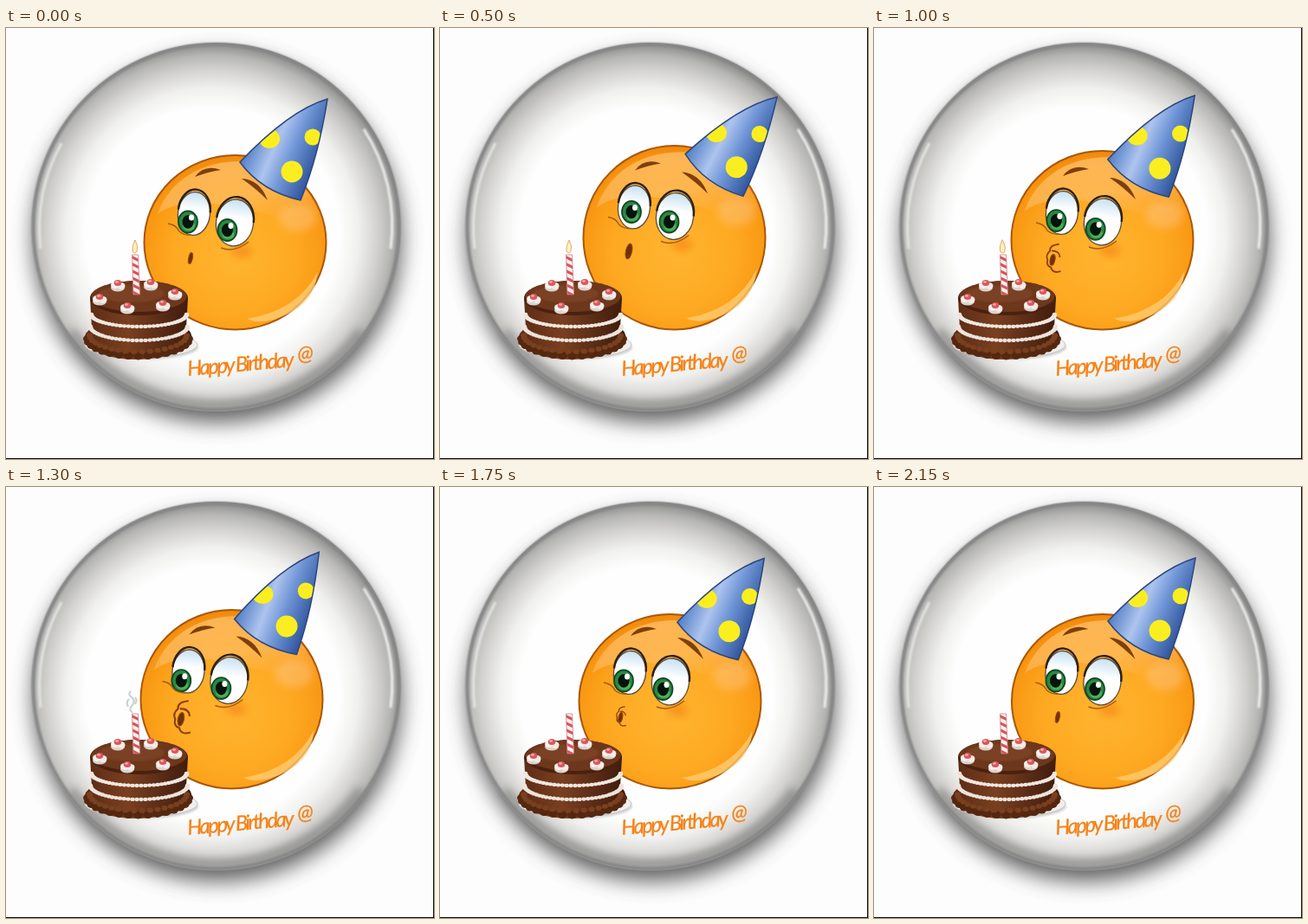
These frames come from a looping animation (494x498 px, 2.2 s). An HTML page:

```html
<!DOCTYPE html>
<html lang="en">
<head>
<meta charset="utf-8">
<title>Happy Birthday</title>
<style>
html, body { margin: 0; width: 100%; height: 100%; overflow: hidden; background: #fdfdfd; }
svg { display: block; width: 494px; height: 498px; }
text { font: italic 24px Lato, "Open Sans", sans-serif; letter-spacing: -2.5px; fill: #f58216; stroke: #f58216; stroke-width: .3; }
</style>
</head>
<body>
<svg viewBox="0 0 494 498">
  <defs>
    <filter id="soft" x="-20%" y="-20%" width="140%" height="140%"><feGaussianBlur stdDeviation="12"/></filter>
    <filter id="edge" x="-10%" y="-10%" width="120%" height="120%"><feGaussianBlur stdDeviation="1"/></filter>
    <filter id="glow" x="-50%" y="-50%" width="200%" height="200%"><feGaussianBlur stdDeviation="5"/></filter>
    <radialGradient id="badge" gradientUnits="userSpaceOnUse" cx="238" cy="238" r="222">
      <stop offset=".66" stop-color="#fefefe"/>
      <stop offset=".76" stop-color="#f0f0ee"/>
      <stop offset=".86" stop-color="#d2d1ce"/>
      <stop offset=".93" stop-color="#b6b6b4"/>
      <stop offset="1" stop-color="#858585"/>
    </radialGradient>
    <radialGradient id="skin" cx=".5" cy=".58" r=".6">
      <stop offset="0" stop-color="#ffb530"/>
      <stop offset=".55" stop-color="#fea922"/>
      <stop offset=".85" stop-color="#f99812"/>
      <stop offset="1" stop-color="#ee820a"/>
    </radialGradient>
    <linearGradient id="shine" x1="0" y1="0" x2=".3" y2="1">
      <stop offset="0" stop-color="#ffd08a" stop-opacity=".6"/>
      <stop offset=".6" stop-color="#ffc67c" stop-opacity=".5"/>
      <stop offset="1" stop-color="#ffc070" stop-opacity="0"/>
    </linearGradient>
    <linearGradient id="hatFill" gradientUnits="userSpaceOnUse" x1="-32" y1="-26" x2="42" y2="6">
      <stop offset="0" stop-color="#5580c6"/>
      <stop offset=".36" stop-color="#adc4ee"/>
      <stop offset=".62" stop-color="#6f95d6"/>
      <stop offset="1" stop-color="#30559c"/>
    </linearGradient>
    <linearGradient id="white" x1="0" y1="0" x2="0" y2="1">
      <stop offset="0" stop-color="#c4e0f2"/>
      <stop offset=".4" stop-color="#fff"/>
    </linearGradient>
    <linearGradient id="choc" x1="0" x2="1">
      <stop offset="0" stop-color="#5a2a14"/>
      <stop offset=".4" stop-color="#7a3f20"/>
      <stop offset="1" stop-color="#3c1a0c"/>
    </linearGradient>
    <path id="coneShape" d="M-35-22Q22-82 66-95Q56-30 35 22Q-10 12-35-22z"/>
    <clipPath id="stage"><path d="M0 73H398V498H0z"/></clipPath>
    <clipPath id="cone"><use href="#coneShape"/></clipPath>
    <clipPath id="wax"><path d="M145.500 262h7l2 46h-7.500z"/></clipPath>
  </defs>

  <rect width="494" height="498" fill="#fdfdfd"/>
  <circle cx="244" cy="243" r="213" fill="#4c4c4c" opacity=".85" filter="url(#soft)"/>
  <circle cx="242.500" cy="230" r="213" fill="url(#badge)"/>
  <path d="M75 350A207 207 0 0 0 410 350" fill="none" stroke="#6c6c6c" stroke-width="12" opacity=".5" filter="url(#glow)"/>
  <g fill="none" filter="url(#edge)">
    <circle cx="242.500" cy="230" r="211" stroke="#868686" stroke-width="4"/>
    <path d="M413 117A204 204 0 0 1 444 255" stroke="#f0f0f0" stroke-width="3"/>
    <path d="M40 255A204 204 0 0 1 64 133" stroke="#e4e4e4" stroke-width="3"/>
  </g>

  <g clip-path="url(#stage)">
    <g id="head">
      <ellipse rx="105" ry="105" fill="url(#skin)" stroke="#a9570a" stroke-width="2"/>
      <path d="M-90-34C-72-84-24-104 28-96C72-88 98-52 100-14C64-26 20-40-20-46C-52-50-74-46-90-34z" fill="url(#shine)"/>
      <ellipse cx="72" cy="-30" rx="22" ry="16" fill="#ffcf9a" opacity=".4" filter="url(#glow)"/>
      <path d="M14 92Q72 82 95 36Q92 78 44 93Q24 98 14 92z" fill="#ffd27c" opacity=".7"/>
    </g>
    <g id="features">
      <ellipse cx="272" cy="258" rx="12" ry="7" fill="#f47a08" opacity=".6" filter="url(#glow)"/>
      <g id="eyes"></g>
      <g fill="#7d3f0c">
        <path d="M218 172Q229 157 248 164Q234 166 218 172z"/>
        <path d="M272 174Q293 175 302 199Q288 185 272 174z"/>
      </g>
      <path d="M187 226q9 1 13 9q6 5 14 4M248 254q16 6 32-7" fill="none" stroke="#a85c0c" stroke-width="1.500"/>
    </g>
    <g id="lips" fill="#ffab2c" stroke="#8a4206" stroke-width="1.900" stroke-linejoin="round">
      <path d="M6-17Q-5-16-4-9Q-10-4-7 2Q-9 9-3 11Q-1 19 8 17Q13 8 9 0Q12-9 6-17z" stroke="none"/>
      <path d="M7-17Q-5-16-4-9Q-10-4-7 2Q-9 9-3 11Q-1 19 9 16M-2-9Q8-9 8-1" fill="none"/>
    </g>
    <ellipse id="mouth" fill="#713006" stroke="#94480a"/>
    <g id="hat">
      <g clip-path="url(#cone)">
        <path d="M-40-100H70V30H-40z" fill="url(#hatFill)"/>
        <g fill="#fbee20">
          <ellipse cx="-1" cy="-49" rx="12" ry="11"/>
          <circle cx="49" cy="-51" r="9.500"/>
          <circle cx="25" cy="-11" r="12.500"/>
        </g>
      </g>
      <use href="#coneShape" fill="none" stroke="#2b467d" stroke-width="1.500"/>
    </g>
  </g>

  <g id="cake"></g>
  <path id="flame" d="M149 245Q153 252 151 258Q148.500 262 146 258Q145 252 149 245z" fill="#fff0c4" stroke="#e9a866"/>
  <path id="smoke" d="M146 262q-5-4 0-9q4-5-1-9q-5-3-1-7M141 255q-3-5 1-9M149 252q3-4 0-8" fill="none" stroke="#c4c8cc" stroke-width="2.200"/>

  <text transform="translate(210 402) rotate(-5)">Happy Birthday</text>
  <text transform="translate(337 385) rotate(-5)">@</text>
  <path d="M493 0h1v498H0v-1h493z" fill="#080808"/>
</svg>
<script>
const $ = id => document.getElementById(id);
const ellipse = (x, y, rx, ry, fill, more = '') =>
  `<ellipse cx="${x}" cy="${y}" rx="${rx}" ry="${ry}" fill="${fill}" ${more}/>`;
const range = (n, fn) => Array.from({ length: n }, (_, i) => fn(i)).join('');

// Beads along the front half of an ellipse
const beads = (n, cx, cy, rx, ry, r, fill) => range(n, i => {
  const a = Math.PI * i / (n - 1);
  return ellipse((cx - rx * Math.cos(a)).toFixed(1), (cy + ry * Math.sin(a)).toFixed(1), r, r * .8, fill);
});

const rosette = ([x, y]) =>
  ellipse(x, y + 3, 8, 4.5, '#ddd2cc') + ellipse(x - 3, y, 5, 4, '#f8f1ed') +
  ellipse(x + 4, y + 1, 4.5, 4, '#f4ebe7') + ellipse(x, y - 2.5, 4.3, 3.5, '#d9575c') +
  ellipse(x - 1, y - 3.5, 2, 1.3, '#f5b0ac');

$('cake').innerHTML =
  ellipse(158, 369, 64, 14, '#a9a9a9', 'opacity=".5" filter="url(#edge)"') +
  ellipse(156, 366, 65, 15, '#f0efee', 'stroke="#c6c4c2"') +
  '<path d="M97 312L99 347Q90 351 91 361Q105 383 153 383Q205 381 215 360Q214 350 208 346L210 312z" fill="url(#choc)"/>' +
  beads(17, 152.5, 359, 58, 20, 5.5, '#55270f') +
  beads(20, 152.5, 355, 56, 19, 3.5, '#79401f') +
  beads(36, 153.5, 345, 56, 16, 2.7, '#ece4dc') +
  beads(36, 153.5, 331, 55, 14, 2.7, '#efe7df') +
  ellipse(153.5, 312, 56.5, 20, '#4a2110') +
  ellipse(153.5, 310, 55, 18, '#6d371c') +
  ellipse(145, 307, 38, 10, '#84482a', 'opacity=".6" filter="url(#edge)"') +
  [[129, 297], [167, 296], [108, 313], [195, 307], [181, 320], [140, 323]].map(rosette).join('') +
  '<g clip-path="url(#wax)"><path d="M140 255h20v60h-20z" fill="#fff1ee"/>' +
  range(7, i => `<path d="M142 ${263 + i * 8}l14 7" stroke="#d6545c" stroke-width="3.2"/>`) + '</g>' +
  '<path d="M145.500 262h7l2 46h-7.500z" fill="none" stroke="#c98084" stroke-width=".8"/>';

const iris = (id, x, y) => `<g id="${id}">` +
  ellipse(x, y, 11, 12.5, '#2a8842', 'stroke="#124a26" stroke-width="1.8"') +
  ellipse(x + 1, y + 5, 7, 5.5, '#4fae59') + ellipse(x, y, 6.5, 7.8, '#06140c') +
  ellipse(x + 4, y - 5, 3, 3.5, '#fff') + '</g>';
const eye = (id, x, y, rx, ry, tilt, ix, iy) =>
  `<g transform="rotate(${tilt} ${x} ${y})">` +
  ellipse(x, y, rx, ry, 'url(#white)', 'stroke="#5d4a38" stroke-width="1.3"') +
  `<path d="M${x - rx} ${y - 3}A${rx} ${ry} 0 0 1 ${x + rx} ${y - 3}" fill="none" stroke="#2c2117" stroke-width="2.4"/></g>` +
  iris(id, ix, iy);
$('eyes').innerHTML = eye('irisL', 217, 214.5, 18.5, 25, 6, 210, 224) + eye('irisR', 264, 225, 21.5, 27, 8, 255.5, 233.5);

// time, head x, head top, face dx dy, hat dx dy turn, gaze, mouth x y, open, pucker
const LOOP = 2200, STEP = 50, FLOOR = 348.5;
const poses = [
  [0, 264.5, 147, 0, 0, 0, 0, 0, 0, 213, 266, 0, 0],
  [500, 270.5, 136, 7, -7.5, 11.5, -7, 4, 1, 218, 258, .5, 0],
  [800, 276, 129, 14.5, -13, 21.5, -10.5, 5.5, 1, 222, 251, 1, 0],
  [1000, 263.5, 142, 0, -1, 0, -3.5, -.5, .1, 207, 266, .2, .95],
  [1300, 260.5, 142, -6.5, -1.5, -5.5, -4, -2.5, -.3, 203, 266, .5, 1.1],
  [1750, 265.5, 147, 2, 0, 4, 1, -.5, 0, 209, 265, 0, .65],
  [2150, 264, 147, -.5, 0, 0, 0, 0, 0, 212, 266, 0, 0]
];
poses.push([LOOP, ...poses[0].slice(1)]);

const secant = (i, j) => (poses[i + 1][j] - poses[i][j]) / (poses[i + 1][0] - poses[i][0]);

// Smooth through each pose, at rest where a value turns back
function slope(i, j) {
  if (i === 0 || i === poses.length - 1) return 0;
  const a = secant(i - 1, j), b = secant(i, j);
  return a * b <= 0 ? 0 : 2 * a * b / (a + b);
}

function poseAt(t) {
  const i = Math.max(1, poses.findIndex(p => p[0] >= t)) - 1;
  const a = poses[i], b = poses[i + 1], span = b[0] - a[0], k = (t - a[0]) / span;
  const ease = k * k * (3 - 2 * k), rest = 1 - k;
  return a.map((v, j) => v + (b[j] - v) * ease +
    span * k * rest * (rest * slope(i, j) - k * slope(i + 1, j)));
}
const move = (id, value) => $(id).setAttribute('transform', value);

function draw(t) {
  const [, x, top, dx, dy, hx, hy, turn, gaze, mx, my, open, pucker] = poseAt(t);
  const ry = (FLOOR - top) / 2;
  move('head', `translate(${x} ${FLOOR - ry}) scale(1 ${ry / 105})`);
  move('features', `translate(${dx} ${dy})`);
  move('irisL', `translate(${gaze * 4} ${gaze * -4})`);
  move('irisR', `translate(${gaze * 2} ${gaze * -2})`);
  move('hat', `translate(${305 + hx} ${177 + hy}) rotate(${turn})`);
  move('lips', `translate(${mx} ${my}) scale(${pucker})`);
  $('lips').style.opacity = pucker > .2 ? 1 : 0;
  move('mouth', `translate(${mx - pucker} ${my + 2 * pucker}) rotate(12)`);
  $('mouth').setAttribute('rx', 2.3 + 2.5 * open);
  $('mouth').setAttribute('ry', 6.5 + 5 * open - pucker);

  const blow = Math.max(0, Math.min(1, (t - 950) / 250));
  $('flame').style.opacity = t < 1250 ? 1 : 0;
  move('flame', `rotate(${-16 * blow} 149 262)`);
  const puff = (t - 1250) / 250;
  $('smoke').style.opacity = puff >= 0 && puff < 1 ? 1 - puff * .8 : 0;
  move('smoke', `translate(0 ${-6 * Math.max(0, puff)})`);
}

function tick() {
  draw(Math.floor(performance.now() % LOOP / STEP) * STEP);
  requestAnimationFrame(tick);
}
tick();
</script>
</body>
</html>
```
